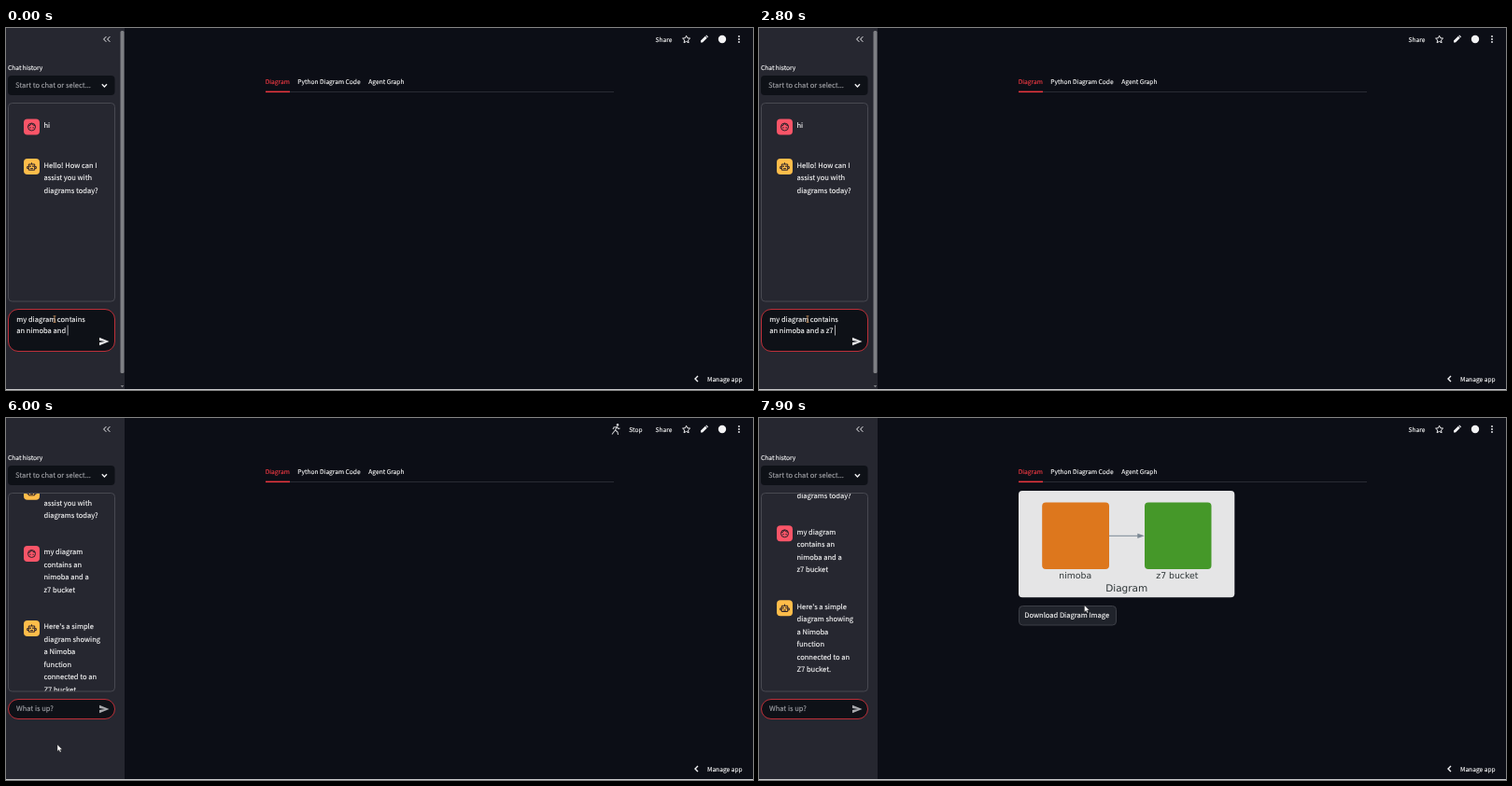
An HTML page for the animation above (8000 ms loop, 800 by 388 pixels).

```html
<!DOCTYPE html>
<html lang="en">
<head>
<meta charset="utf-8">
<title>Diagram chat</title>
<style>
  html, body { margin: 0; width: 100%; height: 100%; overflow: hidden; background: #0c0e16; }
  svg { display: block; width: 100vw; height: 100vh; }
  text {
    font-family: "Noto Sans CJK JP", "Noto Sans CJK SC", "Noto Sans CJK", "Noto Sans", sans-serif;
    font-size: 7.55px; color: #fafafa; fill: currentColor; stroke: currentColor; stroke-width: 0.12;
    white-space: pre; text-rendering: geometricPrecision;
  }
  .small { font-size: 6.64px; }
  .muted { color: #a2a3a8; }
  .active { color: #f23a43; }
  .label { font-family: "DejaVu Sans", sans-serif; font-size: 9.3px; color: #2d3436; stroke: none; text-anchor: middle; }
  .title { font-size: 10.5px; }
  .line { fill: none; stroke: #f0f0f2; stroke-width: 1; }
  .thick { stroke-width: 1.4; }
  .ink { fill: none; stroke: #2b2028; stroke-width: 1; }
</style>
</head>
<body>
<svg id="stage" viewBox="0 0 800 388" preserveAspectRatio="none">
  <defs>
    <clipPath id="chatClip"><rect x="3" y="81" width="113" height="211.5" rx="4"/></clipPath>
    <g id="person">
      <rect width="17" height="17" rx="4" fill="#fa5568"/>
      <circle class="ink" cx="8.5" cy="8.5" r="4"/>
      <path class="ink" d="M4.7 7.6Q7.4 7.4 8.2 4.8Q9.4 7 12.3 7"/>
      <path d="M6.4 8.7h1.2v1.2h-1.2zM9.5 8.7h1.2v1.2h-1.2z" fill="#2b2028"/>
    </g>
    <g id="robot">
      <rect width="17" height="17" rx="4" fill="#ffbd4a"/>
      <path class="ink" d="M5.3 6h6.4v6.2H5.3zM8.5 6V4.3M5 8.6H3.7v2H5M12 8.6h1.3v2H12M7 10.7h3"/>
      <path d="M6.3 7.5h1.5V9H6.3zM9.2 7.5h1.5V9H9.2z" fill="#2b2028"/>
    </g>
  </defs>

  <rect width="800" height="388" fill="#0c0e16"/>
  <rect width="127" height="388" fill="#262730"/>
  <g id="scrollbar" fill="#7e7f84">
    <rect x="122.5" y="3" width="4" height="367" rx="1.5"/>
    <path d="M122.7 383h3.6l-1.8 2.3z"/>
  </g>

  <g id="sidebar">
    <path class="line" d="M107.3 9.2L104.6 12l2.7 2.8M111.3 9.2L108.6 12l2.7 2.8"/>
    <rect x="2" y="51" width="114.5" height="21" rx="4" fill="#0e1117"/>
    <path class="line thick" d="M102.8 60.3l2.6 2.6 2.6-2.6"/>
    <rect x="2.5" y="80.5" width="114" height="212.5" rx="4" fill="none" stroke="#484951"/>
  </g>

  <g clip-path="url(#chatClip)">
    <g id="chat">
      <g id="opening"></g>
      <g id="request"></g>
      <g id="reply"></g>
    </g>
  </g>

  <rect id="inputBox" x="2.5" y="301.5" width="114" rx="10.5" fill="#0e1117" stroke="#bd3039"/>
  <g id="draft"></g>
  <rect id="caret" width="0.8" height="11" fill="#d0d0d4"/>
  <path id="send" d="M-5 -4.3L5.5 0L-5 4.3V1.1L1 0L-5 -1.1z"/>

  <g id="main">
    <path d="M278 68.5H651" stroke="#292b34"/>
    <rect x="278" y="67.6" width="26" height="1.5" fill="#ee3740"/>
    <path class="line" d="M728.6 8.2l1.2 2.6 2.8.3-2.1 1.9.6 2.8-2.5-1.4-2.5 1.4.6-2.8-2.1-1.9 2.8-.3z"/>
    <path d="M744 15.6v-2l4.8-4.8 2 2-4.8 4.8zM749.3 8.3l.8-.8 2 2-.8.8z" fill="#f4f4f6"/>
    <circle cx="767" cy="12" r="4.2" fill="#f4f4f6"/>
    <g fill="#f4f4f6">
      <circle cx="785" cy="9" r="0.9"/><circle cx="785" cy="12" r="0.9"/><circle cx="785" cy="15" r="0.9"/>
    </g>
    <path class="line thick" d="M741 373l-3 3 3 3"/>
  </g>

  <g id="status">
    <circle cx="655" cy="7.4" r="1.3" fill="#c9cacd"/>
    <path id="runner" fill="none" stroke="#c9cacd" stroke-width="1.1"/>
  </g>

  <g id="result">
    <rect x="278" y="78" width="231.3" height="114.3" rx="4" fill="#e5e5e6"/>
    <rect x="303.2" y="90.5" width="71.8" height="71.5" rx="4" fill="#dd771d"/>
    <rect x="413" y="90.5" width="71.5" height="71.5" rx="4" fill="#459829"/>
    <path d="M375 126.3H406" stroke="#7b8894"/>
    <path d="M405.3 123.7L412.8 126.3L405.3 128.9z" fill="#7b8894"/>
    <rect id="button" x="278.5" y="201.5" width="104" height="20.5" rx="4" fill="#131720" stroke="#3d3f47"/>
  </g>

  <rect y="387" width="800" height="1" fill="#c9c9cb"/>
  <path id="beam" d="M50.6 308.8h2.8M52 308.8v6.6M50.6 315.4h2.8" fill="none" stroke-width="0.9"/>
  <path id="pointer" d="M0 0v7.2l1.7-1.5 1.2 2.6 1.2-.5-1.1-2.6h2.2z" fill="#fff" stroke="#222" stroke-width="0.4"/>
</svg>

<script>
const $ = id => document.getElementById(id);
const LOOP = 8000, STEP = 100;
const SUBMIT = 4200, SENT = 5000, REPLY = 5700, DONE = 6300;

function addText(parent, x, middle, content, cls = "") {
  const node = document.createElementNS("http://www.w3.org/2000/svg", "text");
  node.setAttribute("x", x);
  node.setAttribute("y", middle + 2.7);
  node.setAttribute("class", cls);
  node.textContent = content;
  $(parent).append(node);
  return node;
}

function addMessage(parent, avatar, top, lines) {
  const icon = document.createElementNS("http://www.w3.org/2000/svg", "use");
  icon.setAttribute("href", "#" + avatar);
  icon.setAttribute("x", 19);
  icon.setAttribute("y", top);
  $(parent).append(icon);
  lines.forEach((line, i) => addText(parent, 40.5, top + 6.8 + i * 13.5, line));
}

addText("sidebar", 2, 42.6, "Chat history", "small");
addText("sidebar", 10, 61.5, "Start to chat or select...", "muted");
addMessage("opening", "person", 97.5, ["hi"]);
addMessage("opening", "robot", 140, ["Hello! How can I", "assist you with", "diagrams today?"]);
addMessage("request", "person", 206.3, ["my diagram", "contains an", "nimoba and a", "z7 bucket"]);
addMessage("reply", "robot", 286.3,
  ["Here's a simple", "diagram showing", "a Nimoba", "function", "connected to an", "Z7 bucket."]);

addText("main", 277.7, 57.5, "Diagram", "small active");
addText("main", 312.3, 57.5, "Python Diagram Code", "small");
addText("main", 388.3, 57.5, "Agent Graph", "small");
addText("main", 695.5, 12, "Share", "small");
addText("main", 751, 376, "Manage app", "small");
addText("status", 667.3, 12, "Stop", "small");
addText("result", 338.7, 169.6, "nimoba", "label");
addText("result", 447.8, 169.6, "z7 bucket", "label");
addText("result", 393.7, 183.2, "Diagram", "label title");
addText("result", 284.3, 211.6, "Download Diagram Image");

const draftLines = [312, 324, 336].map(y => addText("draft", 11.3, y, ""));
const placeholder = addText("draft", 11, 311.6, "What is up?", "muted");

const typed = "a z7 bucket";
const keyTimes = [1100, 1500, 2000, 2300, 2700, 2900, 3100, 3200, 3400, 3500, 3700];

const show = (id, on) => $(id).setAttribute("display", on ? "inline" : "none");
const progress = (t, from, to) => Math.min(1, Math.max(0, (t - from) / (to - from)));
const smooth = k => k * k * (3 - 2 * k);
const mix = (a, b, k) => a + (b - a) * k;

function drawInput(t) {
  const writing = t < SUBMIT;
  const count = writing ? keyTimes.filter(k => k <= t).length : 0;
  const tail = typed.slice(0, count);
  // The last word wraps onto its own line.
  const lines = writing
    ? ["my diagram contains", "an nimoba and " + tail.slice(0, 5), tail.slice(5)]
    : ["", "", ""];
  draftLines.forEach((node, i) => node.textContent = lines[i].replace(/ /g, "\u00a0"));
  placeholder.setAttribute("display", writing ? "none" : "inline");

  const row = !writing ? 0 : lines[2] ? 2 : 1;
  const width = lines[row] ? draftLines[row].getComputedTextLength() : 0;
  $("caret").setAttribute("x", 11.2 + width);
  $("caret").setAttribute("y", 306.5 + row * 12);
  const since = writing ? (count ? keyTimes[count - 1] : 0) : t < SENT ? SUBMIT : DONE + 100;
  const enabled = t < SENT || t > DONE;
  show("caret", enabled && t >= since && (t - since) % 1000 < 500);

  $("inputBox").setAttribute("height", writing ? 45 : 21);
  $("send").setAttribute("transform", `translate(105 ${writing ? 336 : 312})`);
  $("send").setAttribute("fill", writing ? "#e8e8ea" : "#a9aaae");
  show("scrollbar", writing);
}

function drawChat(t) {
  const scroll = 91 * (1 - Math.pow(1 - progress(t, REPLY, DONE), 2.07));
  $("chat").setAttribute("transform", `translate(0 ${-scroll})`);
  show("request", t >= SENT);
  show("reply", t >= REPLY);
  show("status", t >= SENT && t < DONE);
  const swing = Math.cos((t - 6000) / 400 * Math.PI * 2) * 2;
  $("runner").setAttribute("d",
    `M654.3 9L652.5 13L${653 + swing} 15L${653.5 + swing} 18` +
    `M652.5 13L${651.5 - swing / 2} 15.5L${650 - swing / 2} 17.5` +
    `M654 9.5L651 10L${650.5 - swing / 4} 12M654 9.5L656 11.5L${657 + swing / 4} 11`);
  show("result", t >= DONE);
}

function drawPointer(t) {
  const leave = smooth(progress(t, 5000, 5500));
  const travel = smooth(progress(t, 6900, 7700));
  const x = mix(mix(52, 55, leave), 348.5, travel);
  const y = mix(mix(312, 350, leave), 200.8, travel);
  const inField = y < 323 && travel === 0;
  show("beam", inField);
  $("beam").setAttribute("stroke", t < SUBMIT ? "#bd8a58" : "#dedee0");
  show("pointer", !inField);
  $("pointer").setAttribute("transform", `translate(${x} ${y})`);
  const hover = x > 278 && x < 383 && y > 200 && y < 222;
  $("button").setAttribute("fill", hover ? "#20232b" : "#131720");
}

const start = performance.now();
function draw(now) {
  const t = Math.floor((Math.max(0, now - start) % LOOP) / STEP) * STEP;
  drawInput(t);
  drawChat(t);
  drawPointer(t);
  requestAnimationFrame(draw);
}
draw(start);
</script>
</body>
</html>
```
